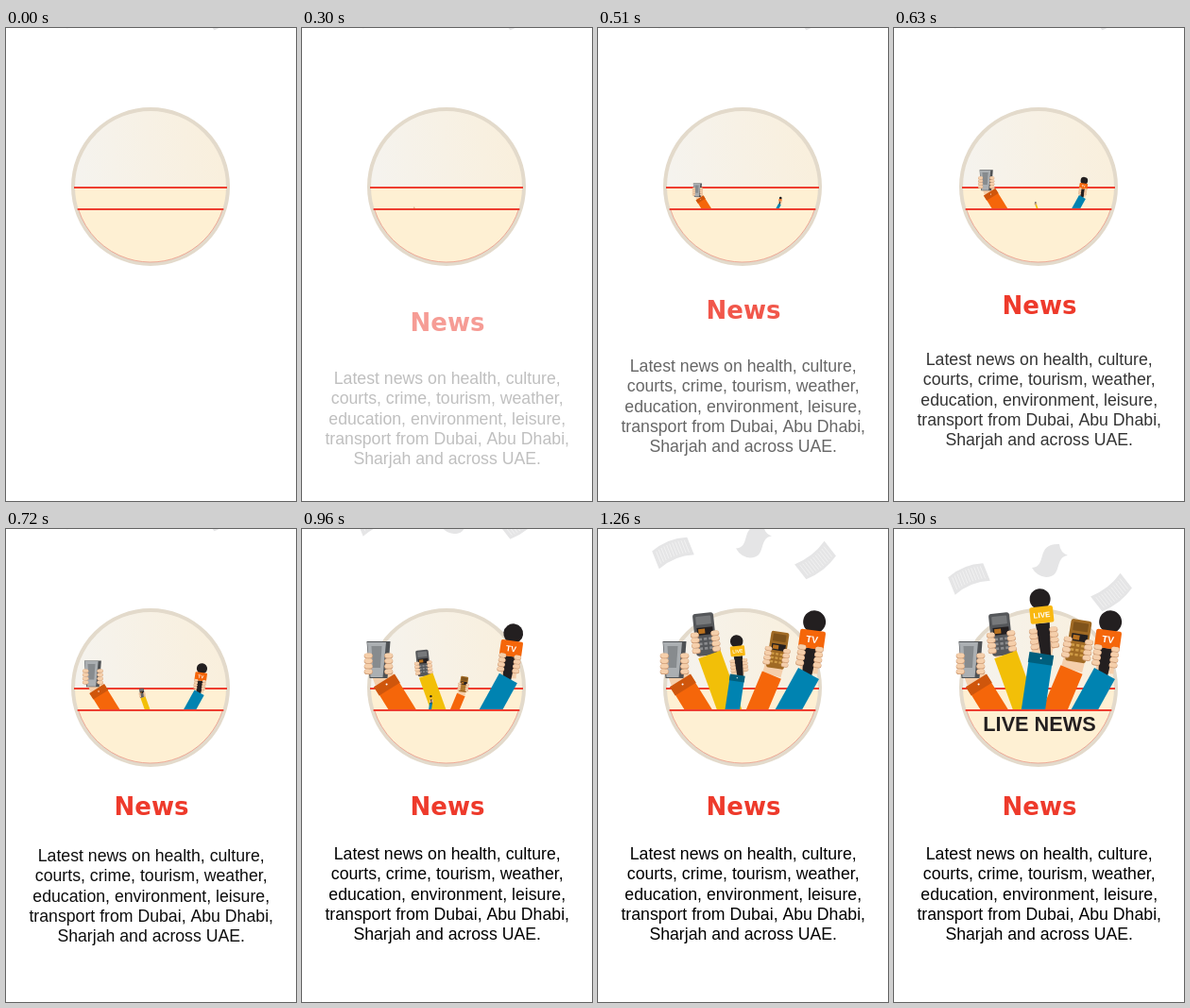
Write an HTML page with a canvas that moves like this. It is 307 by 501 pixels and loops after 4.83 s.

```html
<!DOCTYPE html>
<html lang="en">
<head>
<meta charset="utf-8">
<title>Live news</title>
<style>
html, body { margin: 0; width: 100%; height: 100%; overflow: hidden; background: #fff; }
canvas { display: block; width: 307px; height: 501px; }
</style>
</head>
<body>
<canvas id="stage"></canvas>
<script>
const W = 307, H = 501, LOOP = 4830, STEP = 30, END = 1500;
const SPAN = 600, STAGGER = 150;
const canvas = document.getElementById('stage');
const ctx = canvas.getContext('2d');
const dpr = window.devicePixelRatio || 1;
canvas.width = W * dpr;
canvas.height = H * dpr;

const ORANGE = '#f5660a', BLUE = '#0083b1', YELLOW = '#f2bf08', RED = '#ee3e30';
const SKIN = '#f5cfab', CREASE = '#cf9c76', BLACK = '#231f20', PAPER = '#e5e5e6';
const SANS = '"Liberation Sans", Arial, sans-serif';
const CX = 153, CY = 168, DESK = 191;
const BLURB = [
  'Latest news on health, culture,',
  'courts, crime, tourism, weather,',
  'education, environment, leisure,',
  'transport from Dubai, Abu Dhabi,',
  'Sharjah and across UAE.'
];

const progress = (t, start) => Math.min(1, Math.max(0, (t - start) / SPAN));

function scoped(draw) {
  ctx.save();
  draw();
  ctx.restore();
}

function turned(x, y, deg, draw) {
  scoped(() => {
    ctx.translate(x, y);
    ctx.rotate(deg * Math.PI / 180);
    draw();
  });
}

function line(color, width, x1, y1, x2, y2, cap = 'butt') {
  ctx.strokeStyle = color;
  ctx.lineWidth = width;
  ctx.lineCap = cap;
  ctx.beginPath();
  ctx.moveTo(x1, y1);
  ctx.lineTo(x2, y2);
  ctx.stroke();
}

function arc(color, width, r, from, to) {
  ctx.strokeStyle = color;
  ctx.lineWidth = width;
  ctx.beginPath();
  ctx.arc(CX, CY, r, from, to);
  ctx.stroke();
}

function disc(color, x, y, r) {
  ctx.fillStyle = color;
  ctx.beginPath();
  ctx.arc(x, y, r, 0, Math.PI * 2);
  ctx.fill();
}

function box(color, x, y, w, h, r = 0) {
  ctx.fillStyle = color;
  ctx.beginPath();
  ctx.roundRect(x, y, w, h, r);
  ctx.fill();
}

// Upright trapezoid centred on x
function taper(color, x, top, bottom, wTop, wBottom) {
  ctx.fillStyle = color;
  ctx.beginPath();
  ctx.moveTo(x - wTop / 2, top);
  ctx.lineTo(x + wTop / 2, top);
  ctx.lineTo(x + wBottom / 2, bottom);
  ctx.lineTo(x - wBottom / 2, bottom);
  ctx.fill();
}

function text(str, x, y, font, color) {
  ctx.font = font;
  ctx.fillStyle = color;
  ctx.textAlign = 'center';
  ctx.fillText(str, x, y);
}

// Gadgets are drawn around the middle of the fist
function recorder() {
  taper('#4f5255', 0, -24, 15, 25, 19);
  taper('#abafb2', -2, -23, 14, 20, 13);
  taper('#878b8e', -2, -19, 4, 11, 8);
}

function keypad(body, panel, key) {
  box(body, -11, -31, 22, 45, 3);
  box(panel, -8, -28, 16, 9, 1);
  box(BLACK, -8, -16, 17, 8);
  box('#b9711f', -6.5, -14.5, 7, 5);
  for (let i = 0; i < 9; i++) box(key, -7 + i % 3 * 5.3, -5 + (i / 3 | 0) * 5, 3.4, 2.6);
}

function mic(y, r, label, color, size) {
  const top = y + r - 3, h = r * 1.6, w = r * 2.25;
  taper(BLACK, 0, top + h, 20, 15, 10);
  disc(BLACK, 0, y, r);
  box(color, -w / 2, top, w, h, 2);
  text(label, 0, top + h / 2 + size * 0.36, `bold ${size}px ${SANS}`, '#fff');
}

function fist(x, y, tilt, w, wrist, gadget) {
  line(SKIN, w - 8, x, y, wrist.x, wrist.y);
  turned(x, y, tilt, () => {
    box(SKIN, 3 - w / 2, -10, w - 6, 22, 4);
    gadget();
    for (const side of [-1, 1]) {
      for (let i = 0; i < 4; i++) {
        const fy = -9 + i * 5.6, tip = side * (w / 2 - 2.5), end = side * (w / 2 - 6);
        line(CREASE, 5.6, tip, fy + 0.5, end, fy + 0.5, 'round');
        line(SKIN, 4.8, tip, fy, end, fy, 'round');
      }
    }
  });
}

// A sleeve cut flat at the desk, with an optional darker cuff
function sleeve(base, wrist, color, cuff) {
  const dx = wrist.x - base, dy = wrist.y - DESK, len = Math.hypot(dx, dy);
  const at = d => [base + dx * d / len, DESK + dy * d / len];
  scoped(() => {
    ctx.beginPath();
    ctx.rect(0, 0, W, DESK);
    ctx.clip();
    line(color, 25, ...at(-20), ...at(len));
    if (!cuff) return;
    line(cuff, 26, ...at(len - 9), ...at(len + 2));
    disc('#fff', ...at(len - 3), 1);
  });
}

// Arms sprout one after another from the edge they lean away from
function arm(t, order, base, wrist, color, hold, cuff) {
  const k = progress(t, 290 + order * STAGGER);
  if (!k) return;
  const pivot = base - 13.5 * Math.sign(wrist.x - base);
  scoped(() => {
    ctx.translate(pivot, DESK);
    ctx.scale(k, k);
    ctx.translate(-pivot, -DESK);
    hold(wrist);
    sleeve(base, wrist, color, cuff);
  });
}

function arms(t) {
  arm(t, 0, 106, { x: 88, y: 162 }, ORANGE,
    w => fist(81, 143, 0, 30, w, recorder), '#cf560c');
  arm(t, 1, 202, { x: 223, y: 153 }, BLUE,
    w => fist(224, 135, 8, 27, w, () => mic(-37, 12, 'TV', ORANGE, 10)));
  arm(t, 2, 139, { x: 118, y: 133 }, YELLOW,
    w => fist(114, 120, -6, 30, w, () => keypad('#55575a', '#77797b', '#8b8c8e')));
  arm(t, 3, 170.5, { x: 188, y: 149 }, ORANGE,
    w => fist(194, 127, 9, 31, w, () => keypad('#a06a24', '#7f531b', '#cf9b46')));
  arm(t, 4, 147.5, { x: 156, y: 134 }, BLUE,
    w => fist(159, 116, -6, 30, w, () => mic(-42, 11, 'LIVE', '#f9b812', 8)), '#005f7d');
}

// Falls in from just above the stage; "bottom" is its lowest edge at rest
function drop(t, bottom, draw) {
  scoped(() => {
    ctx.translate(0, -bottom * (1 - progress(t, 900)));
    draw();
  });
}

function page(x, y, deg, bend) {
  const half = 20, tall = 10;
  turned(x, y, deg, () => {
    ctx.fillStyle = PAPER;
    ctx.beginPath();
    ctx.moveTo(-half, -tall);
    ctx.quadraticCurveTo(0, bend - tall, half, -tall);
    ctx.lineTo(half, tall);
    ctx.quadraticCurveTo(0, bend + tall, -half, tall);
    ctx.fill();
    for (let u = -16; u <= 16; u += 3.2) {
      const sag = bend / 2 * (1 - (u / half) ** 2);
      line('#f3f3f3', 0.8, u, sag - 7, u, sag + 7);
    }
  });
}

function curl() {
  ctx.fillStyle = PAPER;
  ctx.beginPath();
  ctx.moveTo(146, 41);
  ctx.bezierCurveTo(163, 40, 149, 15, 175, 16);
  ctx.quadraticCurveTo(176, 25, 184, 28);
  ctx.bezierCurveTo(169, 30, 179, 51, 161, 51);
  ctx.quadraticCurveTo(151, 50, 146, 41);
  ctx.fill();
}

function badge() {
  const shade = ctx.createLinearGradient(75, 150, 232, 130);
  shade.addColorStop(0, '#f5f3ee');
  shade.addColorStop(1, '#f9efdc');
  disc(shade, CX, CY, 82);
  scoped(() => {
    ctx.beginPath();
    ctx.rect(0, 169, W, 90);
    ctx.clip();
    disc('#fef0d3', CX, CY, 82);
  });
  arc('#e3dacb', 4, 82, 0, Math.PI * 2);
  const dip = Math.asin(24 / 80);
  arc('#eb9a88', 0.8, 80, dip, Math.PI - dip);
  for (const y of [169, 192]) {
    const half = Math.sqrt(81 ** 2 - (y - CY) ** 2);
    line(RED, 2, CX - half, y, CX + half, y);
  }
}

// Fades in while rising
function rise(t, start, draw) {
  const k = progress(t, start);
  scoped(() => {
    ctx.globalAlpha = k;
    ctx.translate(0, 36 * (1 - k));
    draw();
  });
}

function render(t) {
  ctx.setTransform(dpr, 0, 0, dpr, 0, 0);
  ctx.fillStyle = '#fff';
  ctx.fillRect(0, 0, W, H);

  drop(t, 69, () => page(79.5, 53, -22, -7));
  drop(t, 51, curl);
  drop(t, 85, () => page(230, 67, -38, 6));

  badge();
  arms(t);
  if (t >= END) text('LIVE NEWS', 154, 213.7, `bold 21.7px ${SANS}`, BLACK);

  rise(t, 0, () => text('News', 154, 303, 'bold 26px "DejaVu Sans", sans-serif', '#ee3a2b'));
  rise(t, STAGGER, () => BLURB.forEach((s, i) =>
    text(s, 153.7, Math.round(350 + i * 21.25), `17.7px ${SANS}`, '#000')));
}

const origin = performance.now();
function tick() {
  const t = (performance.now() - origin) % LOOP;
  render(t < 2 * STEP ? 0 : Math.min(END, Math.floor(t / STEP) * STEP));
  requestAnimationFrame(tick);
}
tick();
</script>
</body>
</html>
```
